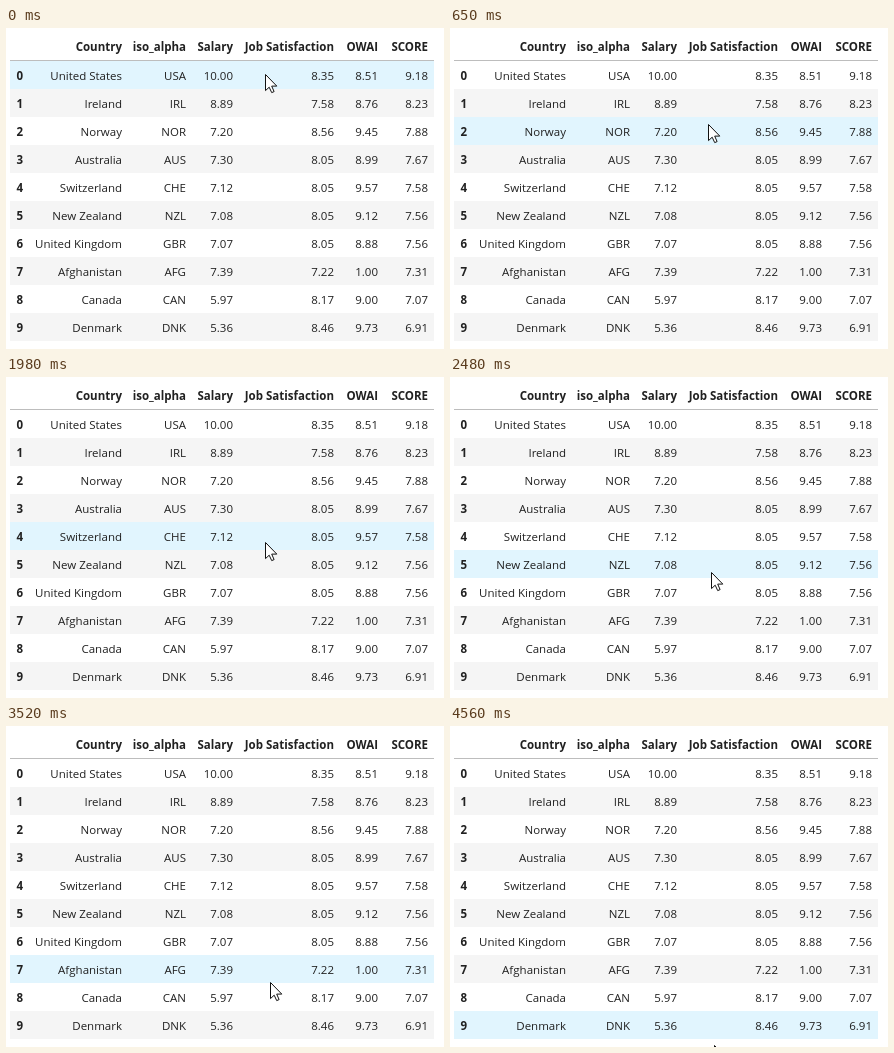
Write an HTML page that moves like this. It is 438 px wide and 321 px high and loops after 4620 ms.

```html
<!DOCTYPE html>
<html lang="en">
<head>
<meta charset="utf-8">
<title>Table row hover</title>
<style>
  html, body { margin: 0; width: 100%; height: 100%; overflow: hidden; background: #fff; }
  svg { display: block; }
  text { font: 11.5px "Open Sans", "Noto Sans", sans-serif; fill: #212121; text-anchor: end; }
  .bold { font-weight: 700; }
</style>
</head>
<body>
<svg width="438" height="321" viewBox="0 0 438 321">
  <g id="table"></g>
  <path id="cursor" d="M.5 .5V16.6L4.2 13.2 6.7 18.6 9.1 17.6 6.7 12.1H11.8Z"
        fill="#fff" stroke="#111" stroke-linejoin="round"/>
</svg>
<script>
const LOOP = 4620, TOP = 33, ROW = 28, STEP = 72;

// Column titles with their right edges
const columns = { '': 17, Country: 116, iso_alpha: 180, Salary: 227,
                  'Job Satisfaction': 328, OWAI: 372, SCORE: 422 };
const edges = Object.values(columns);
const rows = `United States,USA,10.00,8.35,8.51,9.18
Ireland,IRL,8.89,7.58,8.76,8.23
Norway,NOR,7.20,8.56,9.45,7.88
Australia,AUS,7.30,8.05,8.99,7.67
Switzerland,CHE,7.12,8.05,9.57,7.58
New Zealand,NZL,7.08,8.05,9.12,7.56
United Kingdom,GBR,7.07,8.05,8.88,7.56
Afghanistan,AFG,7.39,7.22,1.00,7.31
Canada,CAN,5.97,8.17,9.00,7.07
Denmark,DNK,5.36,8.46,9.73,6.91`.split('\n').map((line, i) => [i, ...line.split(',')]);

// Each move: start time, end time, resting height
const moves = [
  [80, 220, 78], [570, 730, 105], [950, 1250, 131], [1460, 1680, 158], [1980, 2190, 186],
  [2480, 2640, 212], [2940, 3220, 238], [3440, 3660, 274], [4040, 4260, 302], [4480, 4560, 319]
];

const table = document.getElementById('table');
const cursor = document.getElementById('cursor');

function add(tag, attrs, content = '') {
  const el = document.createElementNS('http://www.w3.org/2000/svg', tag);
  for (const key in attrs) el.setAttribute(key, attrs[key]);
  el.textContent = content;
  return table.appendChild(el);
}

const addBar = (y, height, fill) => add('rect', { x: 4, y, width: 424, height, fill });

function addLine(cells, y, header) {
  cells.forEach((cell, c) =>
    add('text', { x: edges[c], y, class: header || c === 0 ? 'bold' : '' }, cell));
}

const stripe = i => i % 2 ? '#f5f5f5' : '#fff';
const bands = rows.map((_, i) => addBar(TOP + i * ROW, ROW, stripe(i)));
addBar(TOP - 1, 1, '#bdbdbd');
addLine(Object.keys(columns), 23, true);
rows.forEach((cells, i) => addLine(cells, TOP + i * ROW + 19, false));

// The cursor goes from rest to rest in equal, evenly timed steps
function cursorY(t) {
  let y = 46;
  for (const [start, end, rest] of moves) {
    if (t < start) break;
    const gaps = Math.round((end - start) / STEP);
    const done = Math.floor((t - start) / (end - start) * gaps + 0.15);
    y += (rest - y) * Math.min(1, (done + 1) / (gaps + 1));
  }
  return Math.round(y);
}

// Sideways drift: a shallow arc that levels off
const cursorX = y => Math.min(264, Math.round(258 + (y - 100) ** 2 / 2900));

function draw(t) {
  const y = cursorY(t);
  const hover = Math.min(rows.length - 1, Math.floor((y - TOP) / ROW));
  bands.forEach((band, i) => band.setAttribute('fill', i === hover ? '#e1f5fe' : stripe(i)));
  cursor.setAttribute('transform', `translate(${cursorX(y)} ${y})`);
}

let origin;
function tick(now) {
  origin ??= now;
  draw((now - origin) % LOOP);
  requestAnimationFrame(tick);
}
draw(0);
requestAnimationFrame(tick);
</script>
</body>
</html>
```
